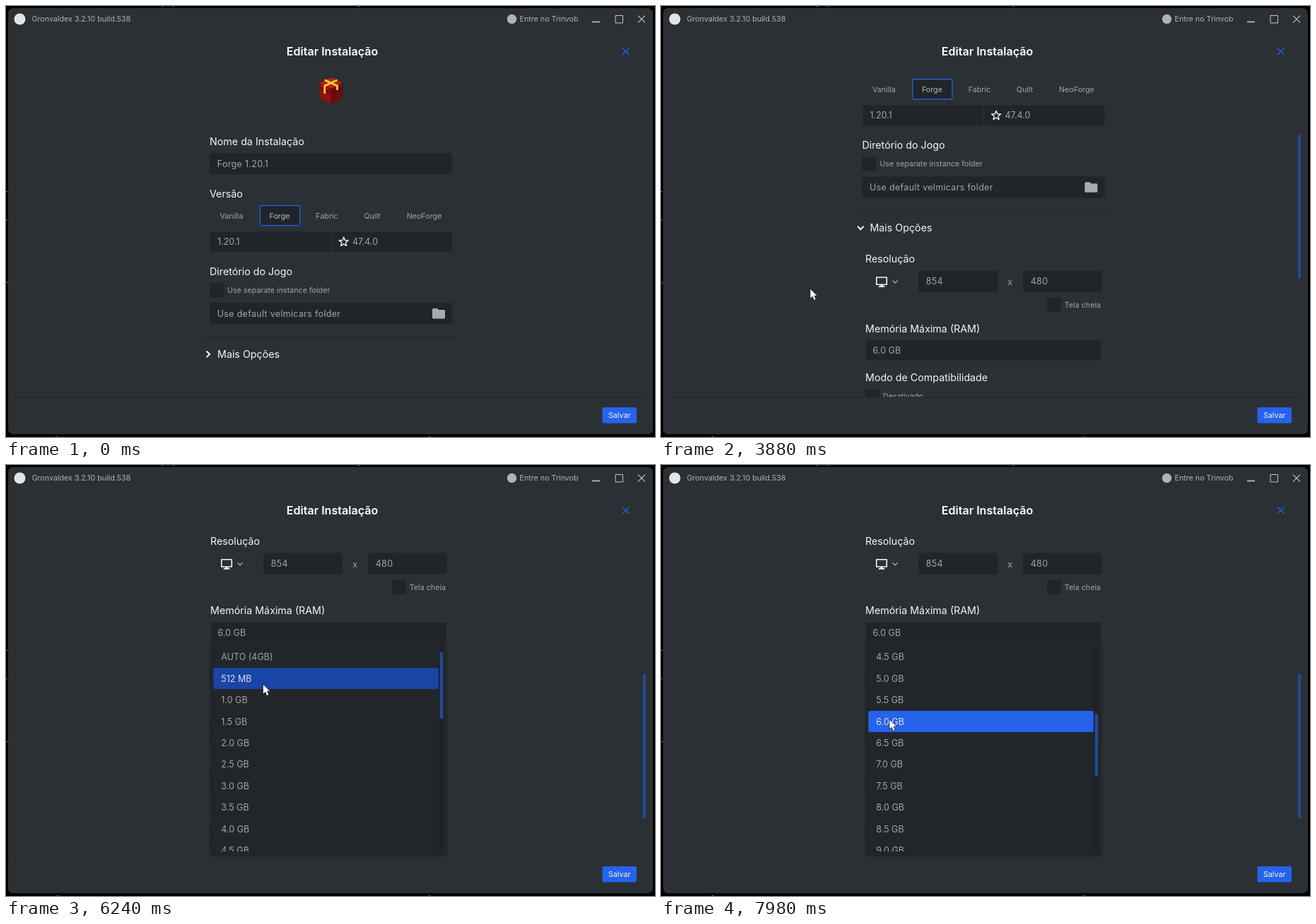
These frames come from a looping animation (918x610 px, 8000 ms). An HTML page:

```html
<!DOCTYPE html>
<html lang="pt-BR">
<head>
<meta charset="utf-8">
<title>Editar Instalação</title>
<style>
  html, body { margin: 0; width: 100%; height: 100%; overflow: hidden; background: #000; }
  svg { display: block; width: 918px; height: 610px; font-family: Inter, sans-serif; }
</style>
</head>
<body>
<svg id="stage" viewBox="0 0 918 610">
  <defs>
    <clipPath id="viewClip"><rect y="94" width="918" height="459"/></clipPath>
    <clipPath id="panelClip"><rect id="panelRect" x="270" y="506" width="380" height="0"/></clipPath>
    <clipPath id="listClip"><rect x="290" y="256" width="333" height="291"/></clipPath>
    <filter id="shadow" x="-10%" y="-10%" width="120%" height="120%">
      <feDropShadow dx="0" dy="1" stdDeviation="2" flood-opacity=".45"/>
    </filter>
  </defs>
</svg>
<script>
const BG = '#2b3034', FIELD = '#212529', BLUE = '#2563eb', HOVER = '#1a45a6',
      BAR = '#23489c', GREY = '#a2a4a6', WHITE = '#f5f5f5';
const XS = 10.71, SM = 12.5, MD = 14.28, LG = 16.07;
const LOOP = 8000, ROW = 30.4, TICK = 35.75;
const stage = document.getElementById('stage');

function set(el, attrs) {
  for (const k in attrs) el.setAttribute(k, attrs[k]);
  return el;
}
function add(parent, tag, attrs) {
  return parent.appendChild(set(document.createElementNS('http://www.w3.org/2000/svg', tag), attrs));
}
const group = (parent, attrs = {}) => add(parent, 'g', attrs);
const box = (g, x, y, width, height, fill, rx = 0, extra = {}) =>
  add(g, 'rect', { x, y, width, height, fill, rx, ...extra });
const line = (g, d, stroke, width, extra = {}) =>
  add(g, 'path', { d, stroke, 'stroke-width': width, fill: 'none', ...extra });
const shape = (g, d, fill) => add(g, 'path', { d, fill });

// Text placed by the middle of its capitals
function text(g, x, mid, str, size, fill = GREY, extra = {}) {
  const el = add(g, 'text', { x, y: mid + size * 0.363, 'font-size': size, fill, ...extra });
  el.textContent = str;
  return el;
}
const centred = { 'text-anchor': 'middle' };
const wide = { 'letter-spacing': SM * 0.025 };
const label = (g, x, y, str) => text(g, x, y, str, MD, WHITE);

function field(g, x, y, w, str, extra = wide) {
  box(g, x, y - 15.3, w, 30.6, FIELD, 3);
  text(g, x + 10.7, y, str, SM, GREY, extra);
}
function select(g, x, y, w, str) {
  box(g, x, y - 14.2, w, 28.4, FIELD, 2);
  text(g, x + 10, y, str, SM);
}
function check(g, x, y, str) {
  box(g, x, y - 10.2, 20.5, 20.5, FIELD, 3);
  text(g, x + 25, y, str, XS);
}

function drawWindow() {
  const specks = [[220, 0], [236, 0], [498, 0], [0, 262], [0, 302], [1, 391], [598, 609], [72, 609]];
  for (const [x, y] of specks) box(stage, x, y, 2, 1, '#777');
  box(stage, 3, 3, 912, 603, BG, 7);
  add(stage, 'circle', { cx: 19.5, cy: 18.5, r: 8, fill: '#e4e4e4' });
  text(stage, 36.5, 18.5, 'Gronvaldex 3.2.10 build.538', XS, '#b0b2b4');
  add(stage, 'circle', { cx: 715.5, cy: 18.5, r: 6.7, fill: '#b0b2b4' });
  text(stage, 726.5, 18.5, 'Entre no Trinvob', XS, '#b0b2b4');
  line(stage, 'M829 22.5H840', '#c4c6c8', 1.6);
  line(stage, 'M862 13.5H872.5V24H862Z', '#c4c6c8', 1);
  line(stage, 'M894 13.7L904 23.7M904 13.7L894 23.7', '#c4c6c8', 1.1);
  text(stage, 461.5, 64, 'Editar Instalação', LG, '#fff', { ...centred, 'font-weight': 600 });
  line(stage, 'M872 59.5L881.5 69M881.5 59.5L872 69', BLUE, 1.2);
  line(stage, 'M12 553.5H907', '#24282c', 1);
  box(stage, 843.5, 568, 48.5, 22.5, BLUE, 2.5);
  text(stage, 867.7, 579.3, 'Salvar', XS, WHITE, centred);
}

function drawGift(g) {
  shape(g, 'M459.7 101L476 109V130L459.7 138.5L443.5 130V109Z', '#6d0c0a');
  shape(g, 'M443.5 109L459.7 117V138.5L443.5 130Z', '#8f120d');
  shape(g, 'M459.7 101L476 109L459.7 117L443.5 109Z', '#c01d14');
  line(g, 'M443.5 115L459.7 123.5L476 115', '#3f0605', 1);
  line(g, 'M451 104.8L468.5 113.2V119M468.5 104.8L450.7 113.2V124', '#e8cf3c', 2.8);
}

function drawForm(g) {
  drawGift(g);
  label(g, 288, 191.5, 'Nome da Instalação');
  field(g, 288, 223.3, 343.5, 'Forge 1.20.1');
  label(g, 288, 266, 'Versão');
  box(g, 359.3, 282.3, 56.3, 28.3, FIELD, 2.5, { stroke: BLUE, 'stroke-width': 1.2 });
  [['Vanilla', 319], ['Forge', 387], ['Fabric', 454], ['Quilt', 518], ['NeoForge', 591.5]]
    .forEach(([s, x]) => text(g, x, 296.7, s, XS, s === 'Forge' ? '#b6b8ba' : GREY, centred));
  select(g, 289, 333.7, 170.5, '1.20.1');
  box(g, 461, 319.5, 170, 28.4, FIELD, 2);
  text(g, 490, 333.7, '47.4.0', SM);
  let star = '';
  for (let i = 0; i < 10; i++) {
    const r = i % 2 ? 3 : 6.8, a = i * Math.PI / 5;
    star += (i ? 'L' : 'M') + (477.7 + r * Math.sin(a)) + ' ' + (333.9 - r * Math.cos(a));
  }
  line(g, star + 'Z', WHITE, 1.4, { 'stroke-linejoin': 'round' });
  label(g, 288, 376, 'Diretório do Jogo');
  check(g, 288, 402.3, 'Use separate instance folder');
  field(g, 288, 435.3, 343.5, 'Use default velmicars folder');
  shape(g, 'M604.5 428H610L612 430H619.5Q621 430 621 431.5V441Q621 442.5 619.5 442.5H604.5Q603 442.5 603 441V429.5Q603 428 604.5 428Z', '#a9abad');
  line(g, 'M280 468.8H640', '#23272b', 1);
  label(g, 299, 493, 'Mais Opções');
}

function drawPanel(g) {
  label(g, 292.6, 536.5, 'Resolução');
  line(g, 'M308.4 562.7H322.9V573H308.4Z', WHITE, 1.6, { 'stroke-linejoin': 'round' });
  shape(g, 'M314 573H317.4V575H320V576.8H311.4V575H314Z', WHITE);
  line(g, 'M331.2 567.3L334.7 570.8L338.2 567.3', GREY, 1.4);
  field(g, 367.6, 568.5, 112, '854');
  text(g, 497.3, 569, 'x', SM, GREY, centred);
  field(g, 515.6, 568.5, 111.5, '480');
  check(g, 549.4, 601.8, 'Tela cheia');
  label(g, 292.6, 635.2, 'Memória Máxima (RAM)');
  select(g, 293.2, 666.2, 333, '6.0 GB');
  label(g, 292.6, 705, 'Modo de Compatibilidade');
  check(g, 292.6, 731.3, 'Desativado');
  label(g, 292.6, 776, 'Executável do Java');
  field(g, 293.2, 807.5, 333, 'Use default Java');
  label(g, 292.6, 848, 'Argumentos da JVM');
  field(g, 293.2, 879.5, 333, '-XX:+UseG1GC');
  label(g, 292.6, 922, 'Argumentos do Jogo');
  field(g, 293.2, 953.5, 333, '');
  label(g, 292.6, 996, 'Visibilidade do Launcher');
}

drawWindow();
const view = group(stage, { 'clip-path': 'url(#viewClip)' });
const page = group(view);
drawForm(page);
const chevron = line(page, 'M-2.4 -4.3L2.2 0L-2.4 4.3', WHITE, 2);
const panel = group(group(page, { 'clip-path': 'url(#panelClip)' }));
drawPanel(panel);
const panelRect = document.getElementById('panelRect');
const bar = box(stage, 901, 101, 4, 204, BAR, 1);

// Memory drop-down
const list = group(stage);
box(list, 290, 253, 332.5, 298, FIELD, 2, { filter: 'url(#shadow)' });
box(list, 612, 256, 6.5, 292, '#1e2125');
const rowsClip = group(list, { 'clip-path': 'url(#listClip)' });
const rowsBox = group(rowsClip);
const names = ['AUTO (4GB)', '512 MB'];
for (let gb = 1; gb <= 12; gb += 0.5) names.push(gb.toFixed(1) + ' GB');
const rows = names.map((name, i) => ({
  mark: box(rowsBox, 293.3, 256.7 + i * ROW, 318.5, 30, 'none', 2.5),
  text: text(rowsBox, 304.3, 271.8 + i * ROW, name, SM)
}));
const CHOSEN = names.indexOf('6.0 GB');
const listBar = box(list, 613.7, 265, 4.3, 81, BAR, 1);

const pointer = group(stage);
const arrow = add(pointer, 'path', {
  d: 'M0 0V14.2L3.2 11.3L5.5 16.4L8.2 15.2L5.9 10.2H10.2Z',
  fill: '#fff', stroke: '#111', 'stroke-width': 0.7
});
const hand = add(pointer, 'path', {
  d: 'M-.8 1.2Q-.8 0 .6 0T2 1.2V6Q4 5.2 5 6.6Q7 6 7.8 7.6Q10.2 7.2 10.2 9.4V13.2Q10.2 15.2 9 16V18.4H.8V16.6L-4.2 11.2Q-5.2 9.8-4 9Q-2.8 8.4-.8 10.6Z',
  fill: '#fff', stroke: '#111', 'stroke-width': 0.7
});

// Pointer stops: time, x, y
const PATH = [
  [190, 831, 598], [330, 735, 470], [500, 590, 330], [680, 430, 245], [800, 340, 214],
  [930, 372, 232], [1060, 345, 210], [1220, 500, 235], [1380, 686, 330], [1520, 640, 455],
  [1700, 507, 515], [1770, 427, 526], [1950, 385, 518], [2260, 361, 501],
  [2930, 361, 501], [3080, 300, 455], [3300, 211, 400],
  [4840, 211, 400], [5060, 260, 345], [5280, 345, 255], [5400, 364, 232], [5520, 363, 240],
  [5620, 361, 251], [5820, 361, 251], [6050, 362, 262], [6300, 364, 325], [6580, 366, 401],
  [6650, 366, 432], [6850, 362, 425], [7420, 345, 386], [7560, 305, 384], [7700, 284, 376],
  [7850, 302, 366], [7980, 323, 360]
];
// Wheel turns: time, notches in total
const WHEEL = [[3340, 1], [3410, 2], [3480, 3], [3880, 5], [3950, 7], [4280, 9], [4350, 11], [4410, 12]];
const LIST_WHEEL = [[6920, 3], [7060, 6], [7200, 9]];

const stepped = (steps, t) => steps.reduce((v, [at, n]) => t >= at ? n : v, 0);
const ease = u => u < 0.5 ? 4 * u ** 3 : 1 - (2 - 2 * u) ** 3 / 2;

function pointerAt(t) {
  const i = PATH.findIndex(p => p[0] > t);
  if (i < 0) return PATH[PATH.length - 1].slice(1);
  if (i === 0) return PATH[0].slice(1);
  const [t0, x0, y0] = PATH[i - 1], [t1, x1, y1] = PATH[i];
  const u = (t - t0) / (t1 - t0);
  return [x0 + (x1 - x0) * u, y0 + (y1 - y0) * u];
}
const show = (el, on) => el.setAttribute('visibility', on ? 'visible' : 'hidden');

function render(t) {
  const [x, y] = pointerAt(t);

  // Panel unfolding and page scroll
  const u = Math.min(1, Math.max(0, (t - 2735) / 300)), open = ease(u);
  const scroll = stepped(WHEEL, t) * TICK;
  const content = 499 + 494 * open;
  page.setAttribute('transform', `translate(${u > 0 ? -3.6 : 0} ${-scroll})`);
  chevron.setAttribute('transform', `translate(286 492.8) rotate(${90 * u})`);
  panel.setAttribute('transform', `translate(0 ${-494 * (1 - open)})`);
  panelRect.setAttribute('height', Math.max(0, 494 * open - 4));
  show(bar, u > 0);
  set(bar, { y: 101 + scroll * 0.454, height: 450 * 450 / content });

  // Drop-down
  const isOpen = t >= 5460;
  const top = stepped(LIST_WHEEL, t);
  list.setAttribute('display', isOpen ? 'inline' : 'none');
  rowsBox.setAttribute('transform', `translate(0 ${-top * ROW})`);
  const inside = isOpen && x > 293 && x < 612 && y > 257;
  const hovered = inside ? Math.floor((y - 256.5) / ROW) + top : -1;
  rows.forEach((row, i) => {
    const fill = i === CHOSEN ? BLUE : i === hovered ? HOVER : 'none';
    row.mark.setAttribute('fill', fill);
    row.text.setAttribute('fill', fill === 'none' ? GREY : '#dfe3ea');
  });
  set(listBar, { y: 265 + 87 * top / 9, height: t < 6100 ? 81 : top ? 88 : 94 });

  const overLink = t >= 2230 && t < 2960;
  pointer.setAttribute('display', t < 190 ? 'none' : 'inline');
  pointer.setAttribute('transform', `translate(${x} ${y})`);
  show(arrow, !overLink);
  show(hand, overLink);
}

function tick() {
  render(performance.now() % LOOP);
  requestAnimationFrame(tick);
}
tick();
</script>
</body>
</html>
```
